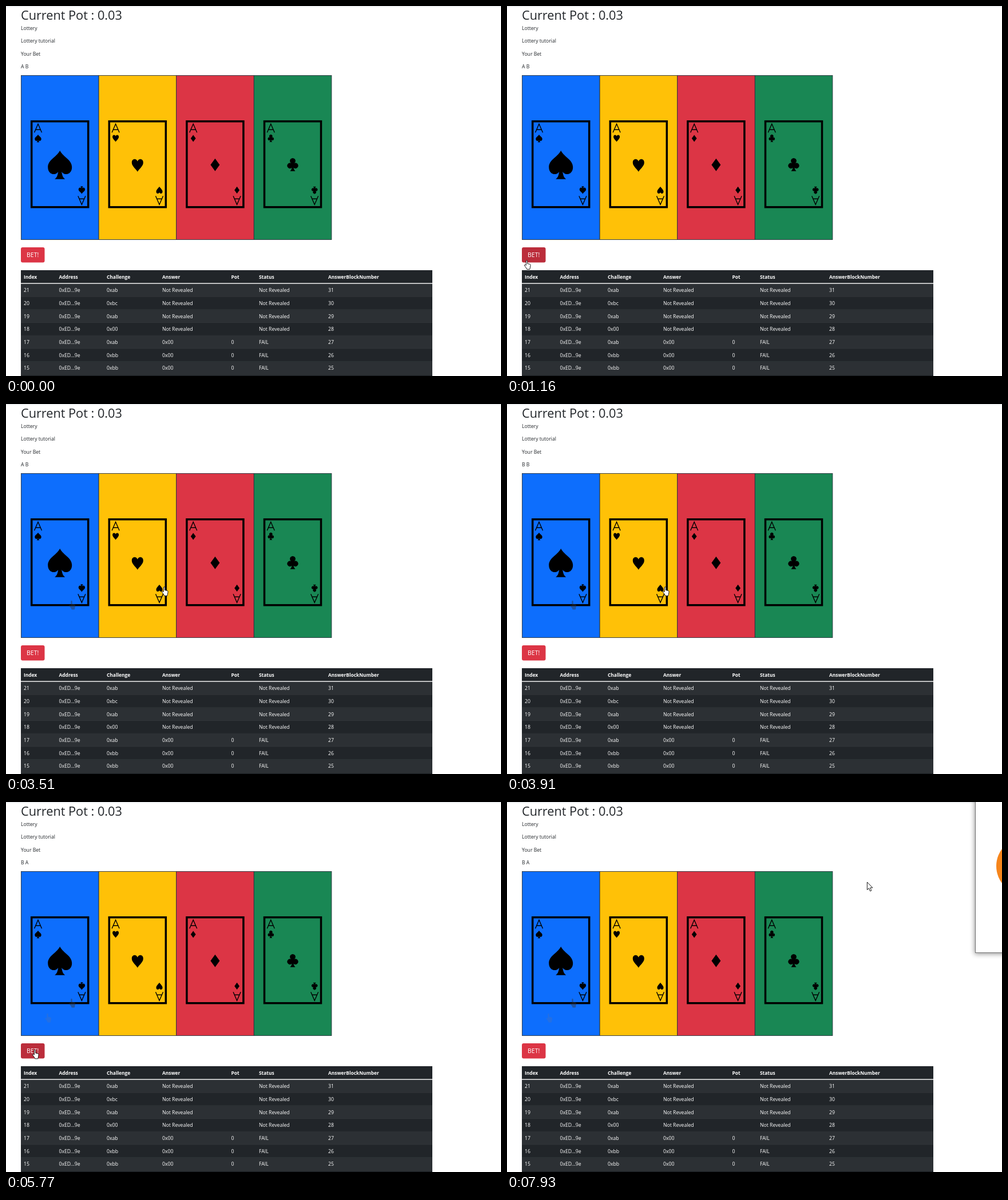
Animation, 865 px wide and 647 px high, one loop 7.99 s. Source, as an HTML page:

```html
<!DOCTYPE html>
<html lang="en">
<head>
<meta charset="utf-8">
<title>Lottery</title>
<style>
  html, body { margin: 0; width: 100%; height: 100%; overflow: hidden; background: #fff; }
  svg { position: fixed; inset: 0; width: 100%; height: 100%; display: block; }
  text { font: 8.65px "Open Sans", "Noto Sans", sans-serif; fill: #212529; white-space: pre; }
  .title { font-size: 21.7px; }
  .head { font-size: 8.4px; font-weight: 700; fill: #fff; }
  .cell { font-size: 8.7px; fill: #fff; }
  .label { font-size: 10.5px; fill: #fff; }
</style>
</head>
<body>
<svg id="stage" viewBox="0 0 865 647">
  <defs>
    <path id="spade" d="M0-25C5-14 21-9 21 4C21 17 8 20 3 12C4 18 5 22 9 25H-9C-5 22-4 18-3 12C-8 20-21 17-21 4C-21-9-5-14 0-25Z"/>
    <path id="heart" d="M0 11C-4 5-10 1-10-5C-10-12-2-13 0-7C2-13 10-12 10-5C10 1 4 5 0 11Z"/>
    <path id="diamond" d="M0-11L8 0 0 11-8 0Z"/>
    <path id="club" d="M-3-3A4.9 4.9 0 1 1 3-3A4.8 4.8 0 1 1 1.5 5Q2 9 4.5 11H-4.5Q-2 9-1.5 5A4.8 4.8 0 1 1-3-3Z"/>
    <path id="hand" d="M-1.2 9V1.5a1.2 1.2 0 0 1 2.4 0V6l4 .9q1.6.4 1.4 2L6 12.5q-.2 1.6-.8 3.4H.3Q-.7 13.5-2.7 11.1L-3.9 9.5q-.6-1.2.6-1.6 1 0 2.1 1.1Z"/>
    <path id="arrow" d="M.5.5V14L3.5 11.2 5.7 16.3 8 15.3 5.8 10.4H10Z"/>
    <filter id="blur" x="-20%" y="-20%" width="140%" height="140%"><feGaussianBlur stdDeviation="4"/></filter>
  </defs>
  <rect y=".5" width="865" height="1" fill="#dee2e6"/>
  <g id="page"></g>
  <use id="ghost1" href="#hand" x="114.5" y="343.5" fill="#333" opacity=".42"/>
  <use id="ghost2" href="#hand" x="72.5" y="369.5" fill="#4a74b8" opacity=".35"/>
  <rect id="ring" x="25.1" y="421.1" width="43.3" height="28.3" rx="4" fill="none" stroke="#f0a9b0" stroke-width="2.2"/>
  <rect id="button" x="26" y="422" width="41.5" height="26.5" rx="3"/>
  <text class="label" x="36" y="439.2">BET!</text>
  <g id="popup">
    <rect id="shadow" x="-1" y="-20" width="80" height="285" filter="url(#blur)"/>
    <rect id="pane" x=".5" y="-20" width="80" height="282.5" fill="#fff"/>
    <circle id="badge" cx="87" cy="111" r="50" fill="#f6851b"/>
  </g>
  <g id="pointer" fill="#fff" stroke="#000" stroke-width=".9" stroke-linejoin="round">
    <use id="handUse" href="#hand"/>
    <use id="arrowUse" href="#arrow"/>
  </g>
</svg>
<script>
const LOOP = 7990, TICK = 70;
const $ = id => document.getElementById(id);
const show = (id, on) => $(id).setAttribute('display', on ? 'inline' : 'none');
const set = (id, attrs) => { for (const k in attrs) $(id).setAttribute(k, attrs[k]); };

const rect = (x, y, w, h, fill, more = '') =>
  `<rect x="${x}" y="${y}" width="${w}" height="${h}" fill="${fill}" ${more}/>`;
const text = (x, y, s, cls = '', id = '') =>
  `<text x="${x}" y="${y}" class="${cls}" id="${id}">${s}</text>`;

const SUITS = [
  ['spade', '#0d6efd', 0.27, 1],
  ['heart', '#ffc107', 0.55, 2],
  ['diamond', '#dc3545', 0.55, 1],
  ['club', '#198754', 0.56, 1]
];

function card([suit, color, small, dy], i) {
  const x = 26.5 + 135.6 * i;
  const corner = `<path d="M-44.7-55.5L-38.2-70.5-31.7-55.5M-42.3-60.5H-34.1" fill="none" stroke="#000" stroke-width="1.4"/>
    <use href="#${suit}" transform="translate(-38.2 -45.2) scale(${small})"/>`;
  return rect(x, 121.5, 135.6, 287, color, `id="card${i}" stroke="#29323c" stroke-width=".9"`) +
    `<g transform="translate(${x + 67.7} 276.7)">
      <rect x="-49.5" y="-75" width="99" height="150" fill="none" stroke="#000" stroke-width="3.5"/>
      ${corner}<g transform="rotate(180)">${corner}</g>
      <use href="#${suit}" y="${dy}"/></g>`;
}

function table() {
  const cols = [31, 92.5, 176, 273, 393.5, 442, 563];
  const heads = ['Index', 'Address', 'Challenge', 'Answer', 'Pot', 'Status', 'AnswerBlockNumber'];
  const line = (y, cells, cls) => cells.map((s, c) => text(cols[c], y, s, cls)).join('');
  let out = rect(26, 462, 719, 185, '#212529') + line(477.2, heads, 'head');
  ['ab', 'bc', 'ab', '00', 'ab', 'bb', 'bb'].forEach((bet, i) => {
    const y = 485.7 + 22.7 * i, open = i < 4;
    if (i % 2 === 0) out += rect(26, y, 719, 22.7, '#2c3034');
    out += rect(26, y + 22.1, 719, 0.6, '#373b3e');
    out += line(y + 14.4, [21 - i, '0xED...9e', '0x' + bet, open ? 'Not Revealed' : '0x00',
      open ? '' : '0', open ? 'Not Revealed' : 'FAIL', 31 - i], 'cell');
  });
  return out + rect(26, 484.4, 719, 1.4, '#fff');
}

$('page').innerHTML =
  text(26, 23.8, 'Current Pot : 0.03', 'title') +
  ['Lottery', 'Lottery tutorial', 'Your Bet'].map((s, i) => text(26, 42.3 + 22.1 * i, s)).join('') +
  text(26, 108.7, 'A B', '', 'bet') +
  SUITS.map(card).join('') + table();

// start time, number of ticks, way points of the pointer tip
const MOVES = [
  [320, 12, [757, 636], [300, 520], [34.5, 444.5]],
  [2960, 8, [34.5, 444.5], [114.5, 343.5], [276.5, 319.5]],
  [4310, 4, [276.5, 319.5], [114.5, 299.5]],
  [5070, 11, [114.5, 299.5], [72.5, 369.5], [50.5, 433]],
  [7660, 5, [50.5, 433], [696, 105.5]]
];

function tip(t) {
  const move = MOVES.filter(m => t >= m[0]).pop();
  if (!move) return null;
  const [start, n, ...pts] = move;
  const p = Math.min(1, (Math.floor((t - start) / TICK) + 1) / n);
  const s = p * p * (3 - 2 * p) * (pts.length - 1);
  const i = Math.min(pts.length - 2, Math.floor(s));
  return pts[i].map((v, k) => v + (pts[i + 1][k] - v) * (s - i));
}

const inside = (p, x0, y0, x1, y1) => p && p[0] >= x0 && p[0] <= x1 && p[1] >= y0 && p[1] <= y1;

// brief dip in brightness after a click on a card
function flash(i, t, from, to) {
  const p = (t - from) / (to - from);
  const dim = p >= 0 && p < 1 ? 0.05 * (1 - p) : 0;
  $('card' + i).style.filter = dim ? `brightness(${1 - dim})` : 'none';
}

function draw(t) {
  const p = tip(t);
  const onButton = inside(p, 26, 422, 67.5, 448.5);
  const hand = onButton || inside(p, 26, 121, 569, 409);
  show('pointer', p);
  if (p) set('pointer', { transform: `translate(${p[0]} ${p[1]})` });
  show('handUse', hand);
  show('arrowUse', !hand);

  $('bet').textContent = t < 3650 ? 'A B' : t < 4590 ? 'B B' : 'B A';
  flash(1, t, 3650, 3910);
  flash(0, t, 4590, 4800);
  show('ghost1', t >= 3240);
  show('ghost2', t >= 5460);

  const pressed = t >= 6820 && t < 6960;
  set('button', { fill: pressed ? '#b02a37' : onButton ? '#bb2d3b' : '#dc3545' });
  show('ring', t >= 6820 && t < 7590);
  set('ring', { opacity: Math.min(1, (t - 6750) / 150) });

  const active = t >= 7330;
  show('popup', t >= 7120);
  set('popup', {
    transform: active ? 'translate(818 1)' : 'translate(815 0)',
    opacity: Math.max(0, Math.min(1, (t - 7050) / 140))
  });
  set('shadow', { opacity: active ? 0.4 : 0.18 });
  set('pane', { stroke: active ? '#707070' : '#d4d4d4' });
  show('badge', t >= 7590);
}

const begin = performance.now();
function tick() {
  draw((performance.now() - begin) % LOOP);
  requestAnimationFrame(tick);
}
tick();
</script>
</body>
</html>
```
